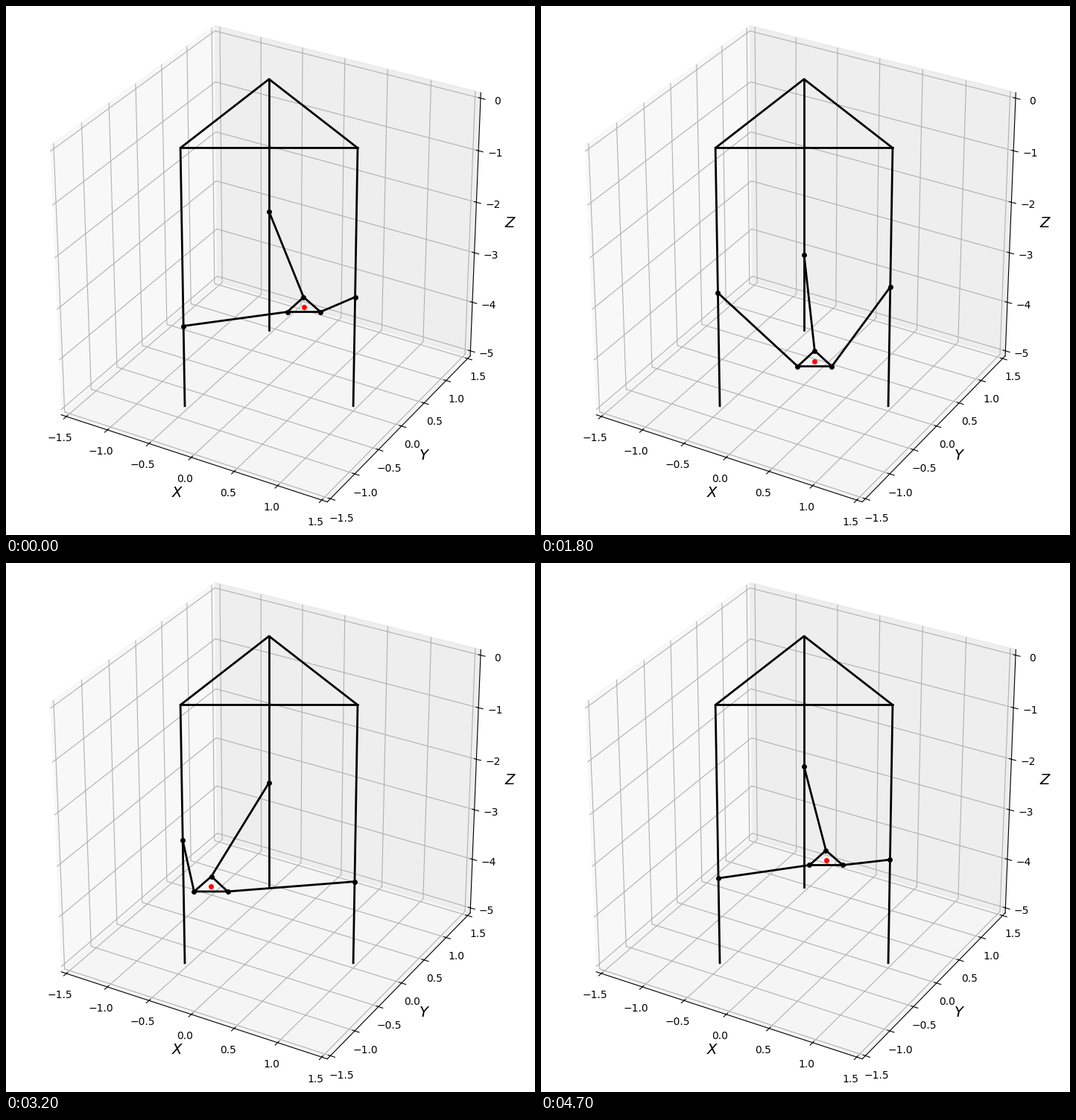
A matplotlib script that plays this animation: 710 by 710 pixels, repeating every 4.8 s.

```python
import numpy as np
import matplotlib.pyplot as plt
from matplotlib.animation import FuncAnimation

SIZE, DPI = 710, 100
FRAMES, INTERVAL = 48, 100

FLOOR = -5.0        # lower end of the rails
ARM = 1.5           # arm length
PLATE = 0.2         # platform radius
ORBIT = 0.6         # radius of the platform's path
HEIGHT = -4.0       # platform height

ANGLES = np.radians([0, 120, 240])
UNIT = np.column_stack([np.cos(ANGLES), np.sin(ANGLES), np.zeros(3)])


def closed(points):
    return np.vstack([points, points[:1]])


def pose(frame):
    """Platform centre, platform corners and slider positions."""
    t = 2 * np.pi * (frame + 1) / 49
    center = np.array([ORBIT * np.sin(t), ORBIT * np.cos(t), HEIGHT])
    corners = center + PLATE * UNIT
    reach = np.sum((UNIT - corners)[:, :2] ** 2, axis=1)
    sliders = UNIT.copy()
    sliders[:, 2] = HEIGHT + np.sqrt(ARM ** 2 - reach)
    return center, corners, sliders


fig = plt.figure(figsize=(SIZE / DPI, SIZE / DPI), dpi=DPI, facecolor="white")
side = 732.1
rect = np.array([-22.9, -0.5, side, side]) / SIZE
ax = fig.add_axes(rect, projection="3d")
ax.view_init(elev=30, azim=-60)
ax.set_box_aspect((1, 1, 1), zoom=0.9467)
ax.yaxis.set_pane_color((0.875, 0.875, 0.875, 0.5))

ax.set_xlim(-1.5, 1.5, view_margin=1 / 48)
ax.set_ylim(-1.5, 1.5, view_margin=1 / 48)
ax.set_zlim(FLOOR, 0, view_margin=1 / 48)
ax.set_xticks(np.arange(-1.5, 1.6, 0.5))
ax.set_yticks(np.arange(-1.5, 1.6, 0.5))
ax.set_zticks(np.arange(-5, 1))
ax.tick_params(pad=3.1)
ax.set_xlabel("$X$", fontsize=14, labelpad=3)
ax.set_ylabel("$Y$", fontsize=14, labelpad=3)
ax.set_zlabel("$Z$", fontsize=14, labelpad=3)


def draw(points, style="k-"):
    return ax.plot(*np.asarray(points).T, style, lw=2, ms=4)[0]


# Fixed frame: top triangle and three rails
draw(closed(UNIT))
for top in UNIT:
    draw([top, top + [0, 0, FLOOR]])

center, corners, sliders = pose(0)
plate = draw(closed(corners))
arms = [draw(pair, "ko-") for pair in zip(sliders, corners)]
dot = draw([center], "ro")


def update(frame):
    center, corners, sliders = pose(frame)
    plate.set_data_3d(*closed(corners).T)
    for arm, slider, corner in zip(arms, sliders, corners):
        arm.set_data_3d(*np.array([slider, corner]).T)
    dot.set_data_3d(*center[:, None])
    return [plate, *arms, dot]


anim = FuncAnimation(fig, update, frames=FRAMES, interval=INTERVAL,
                     repeat=True, repeat_delay=0, blit=False)
plt.show()
```
